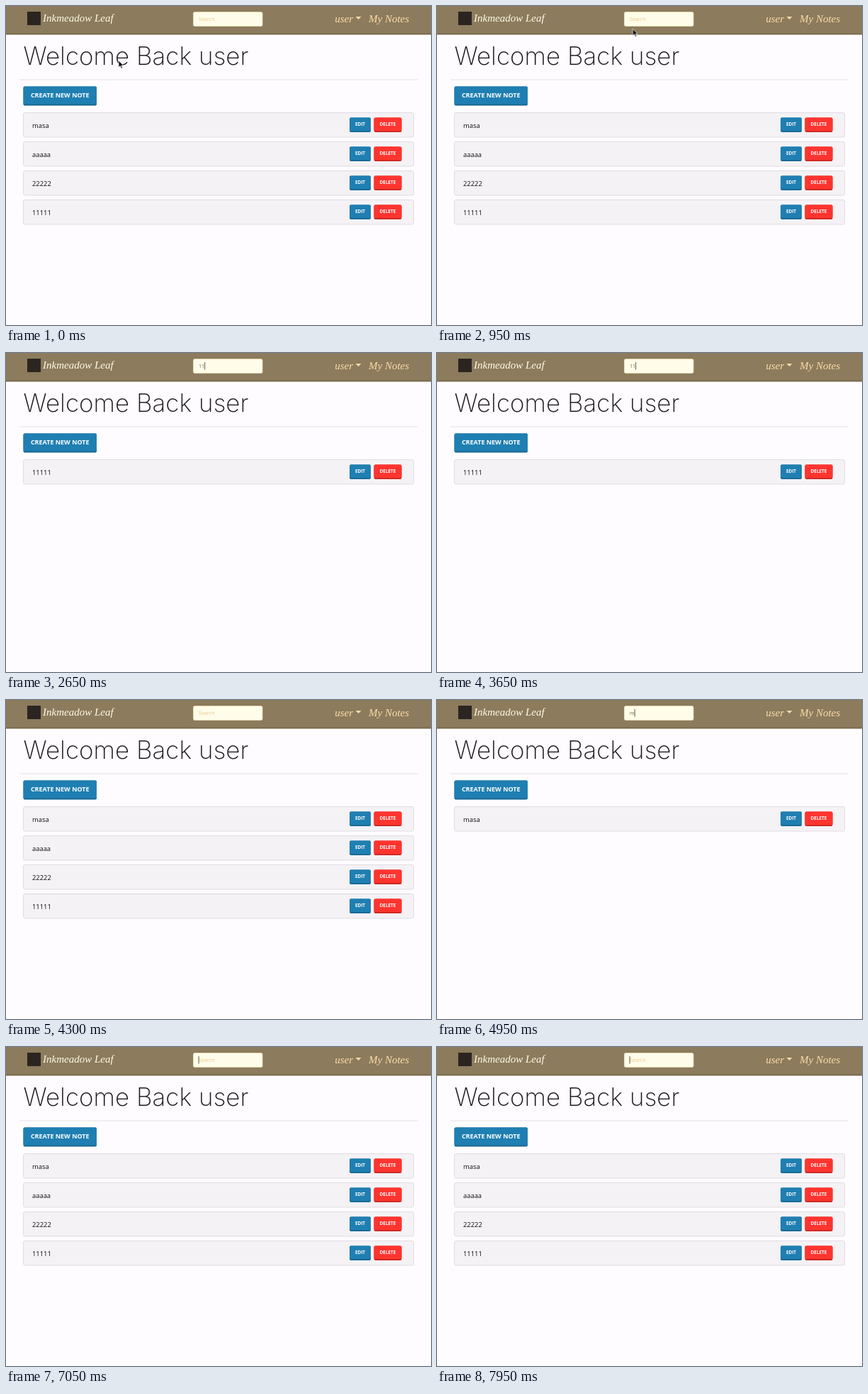
An HTML page for the animation above (8000 ms loop, 600 px wide and 450 px high).

```html
<!DOCTYPE html>
<html lang="en">
<head>
<meta charset="utf-8">
<title>Notes search</title>
<style>
  html, body { margin: 0; width: 100%; height: 100%; overflow: hidden; background: #fefcff; }
  svg { display: block; width: 600px; height: 450px; }
  text { white-space: pre; font-family: "Open Sans", "Noto Sans", sans-serif; }
  .script { font: italic 15px "Liberation Serif", "Noto Serif", serif; fill: #fbdcaa; }
  .brand { fill: #fffae6; }
  .title { font: 200 35px Inter, Roboto, sans-serif; fill: #1c1a1e; }
  .label { font-weight: 700; fill: #fff; text-anchor: middle; }
  .note { font-size: 9.4px; fill: #0c0b0d; }
  .entry { font-size: 7.2px; fill: #7d6a50; }
  .hint { fill: #e9c98a; }

  .pointer { animation: move 8s infinite; }
  .arrow { animation: arrow 8s step-end infinite; }
  .beam { animation: beam 8s step-end infinite; }
  .ring { animation: ring 8s step-end infinite; }

  @keyframes move {
    0%, 1% { transform: translate(159px, 77px); animation-timing-function: ease-in-out; }
    17%, 100% { transform: translate(308px, 20px); }
  }
  @keyframes arrow { 0% { opacity: 1; } 12.6%, 100% { opacity: 0; } }
  @keyframes beam { 0% { opacity: 0; } 12.6% { opacity: 1; } 29.375%, 100% { opacity: 0; } }
  @keyframes ring { 0% { opacity: 0; } 18.4% { opacity: 1; } 20.8%, 100% { opacity: 0; } }
</style>
</head>
<body>
<svg viewBox="0 0 600 450">
  <rect width="600" height="450" fill="#fefcff"/>

  <rect width="600" height="40.5" fill="#7b6a4a"/>
  <rect width="600" height="38.5" fill="#8c7b5c"/>
  <rect x="30" y="8" width="19" height="19" fill="#2b2522"/>
  <text class="script brand" x="52" y="22">Inkmeadow Leaf</text>
  <text class="script" x="490" y="23" text-anchor="end">user</text>
  <path d="M493.5 15h8l-4 4z" fill="#fbdcaa"/>
  <text class="script" x="512" y="23">My Notes</text>

  <rect x="264.5" y="8.5" width="97.5" height="20" rx="2" fill="#fffdea" stroke="#f0dfb4" stroke-width=".8"/>
  <text id="hint" class="entry hint" x="272" y="21">Search</text>
  <text id="entry" class="entry" x="272" y="21"></text>
  <rect id="caret" y="13" width=".9" height="10.5" fill="#4d4438"/>

  <text class="title" x="24.5" y="83">Welcome Back user</text>
  <rect x="19" y="103.5" width="562" height="1" fill="#e5e3e6"/>
  <g id="create"></g>
  <g id="notes"></g>

  <g class="pointer">
    <path class="arrow" d="M0 0v9.6l2.3-2 1.5 3.6 1.7-.7-1.5-3.5h3z" fill="#111" stroke="#fff" stroke-width=".7"/>
    <path class="beam" d="M-2.2-5Q0-5 0-3.6Q0-5 2.2-5M0-3.6V3.6M-2.2 5Q0 5 0 3.6Q0 5 2.2 5M-1.2 1.5H1.2"
      fill="none" stroke="#222" stroke-width="1"/>
    <circle class="ring" r="8.8" fill="none" stroke="#15131a" stroke-width="2.3"/>
  </g>
</svg>
<script>
  const LOOP = 8000, START_X = 272, PITCH = 41;
  const BLUE = ['#1f7fb2', '#196a95'], RED = ['#ff342f', '#cf2924'];
  const $ = id => document.getElementById(id);

  const button = (x, y, w, h, label, size, [face, edge]) => `
    <rect x="${x}" y="${y}" width="${w}" height="${h}" rx="2" fill="${edge}"/>
    <rect x="${x}" y="${y}" width="${w}" height="${h - 2}" rx="2" fill="${face}"/>
    <text class="label" x="${x + w / 2}" y="${y + h / 2 - 1 + size * 0.36}" font-size="${size}">${label}</text>`;

  const card = title => `<g>
    <rect x="24.5" y="150.5" width="551" height="34.5" rx="2.5" fill="#f4f2f5" stroke="#dfdde1"/>
    <text class="note" x="37" y="172">${title}</text>
    ${button(485, 157.5, 30, 20.5, 'EDIT', 6.4, BLUE)}
    ${button(519.5, 157.5, 39, 20.5, 'DELETE', 6.4, RED)}</g>`;

  const titles = ['masa', 'aaaaa', '22222', '11111'];
  $('create').innerHTML = button(24.5, 113.5, 103.5, 27, 'CREATE NEW NOTE', 9, BLUE);
  $('notes').innerHTML = titles.map(card).join('');
  const cards = [...$('notes').children];

  // [time, text, start of caret blink]; the blink restarts with each key unless given
  const cues = [
    [1600, ''], [2350, '1'], [2600, '11'], [3950, '1', 3600], [4000, '', 3600],
    [4900, 'm'], [5100, 'ma'], [5400, 'mas'], [5900, 'masa'],
    [6750, 'mas'], [6830, 'ma'], [6880, 'm'], [6930, '']
  ];

  let shown = null;
  function showQuery(query) {
    if (query === shown) return;
    shown = query;
    $('entry').textContent = query;
    $('hint').style.display = query ? 'none' : '';
    $('caret').setAttribute('x', START_X + (query ? $('entry').getComputedTextLength() : -0.4));
    let row = 0;
    cards.forEach((el, i) => {
      const match = titles[i].includes(query);
      el.style.display = match ? '' : 'none';
      if (match) el.setAttribute('transform', `translate(0 ${PITCH * row++})`);
    });
  }

  const origin = performance.now();
  function draw() {
    const t = (performance.now() - origin) % LOOP;
    const cue = cues.filter(c => c[0] <= t).pop();
    const [time, query, blink = time] = cue || [0, ''];
    showQuery(query);
    $('caret').style.opacity = cue && (t - blink) % 1000 < 500 ? 1 : 0;
    requestAnimationFrame(draw);
  }
  draw();
</script>
</body>
</html>
```
